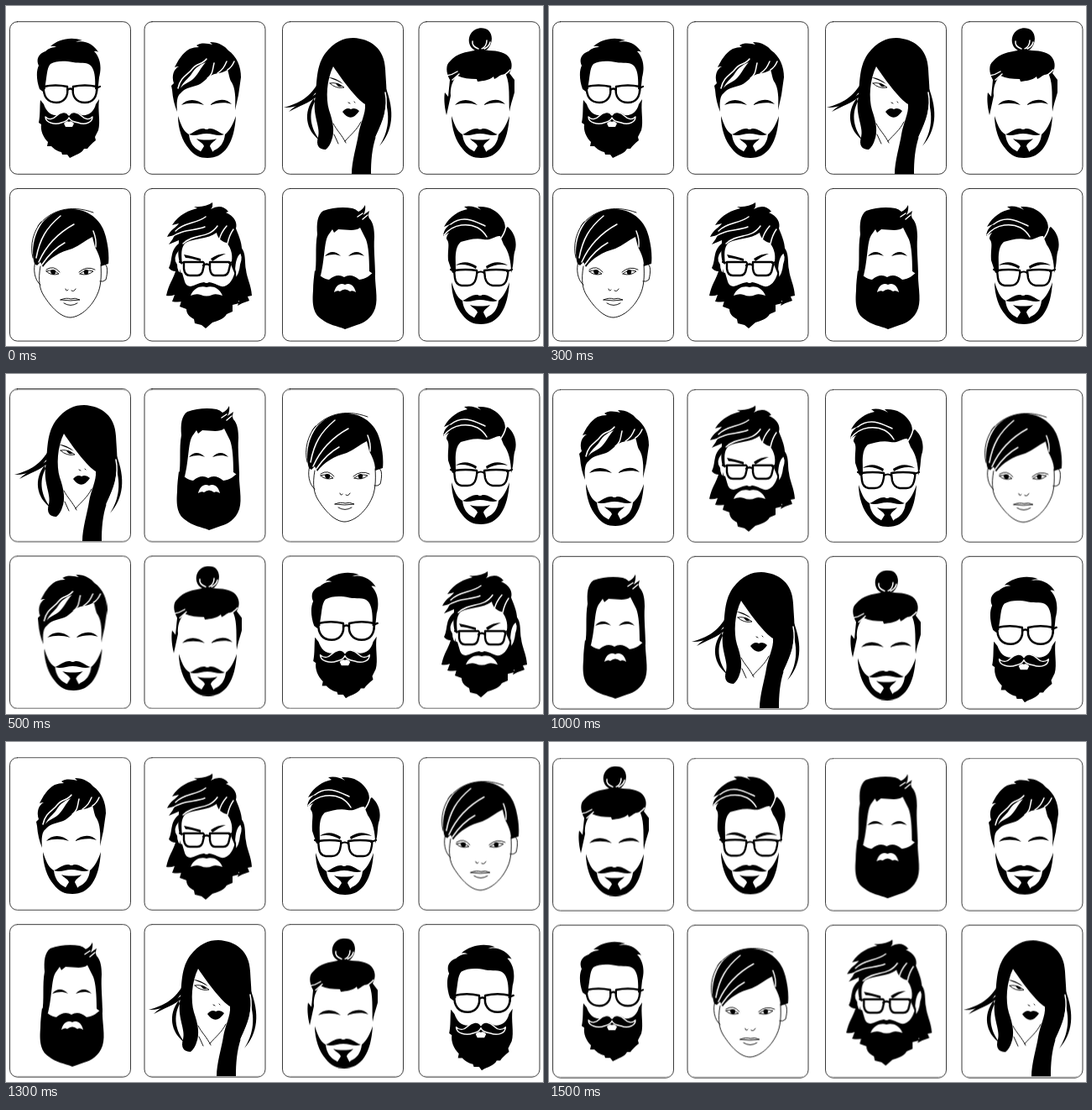
These frames come from a looping animation (640x405 px, 2 s). An HTML page:

```html
<!DOCTYPE html>
<html lang="en">
<head>
<meta charset="utf-8">
<title>Hair styles</title>
<style>
html, body { margin: 0; width: 100%; height: 100%; overflow: hidden; background: #fff; }
svg { display: block; width: 640px; height: 405px; }
path, rect { stroke-linecap: round; stroke-linejoin: round; }
.fill { fill: #000; }
.white { fill: #fff; }
.cut { fill: none; stroke: #fff; stroke-width: 1.5; }
.line { fill: none; stroke: #000; stroke-width: .9; }
.bar { fill: none; stroke: #000; stroke-width: 2.2; }
.rim { fill: #fff; stroke: #000; stroke-width: 2.4; }
.tache { fill: #000; stroke: #fff; stroke-width: 1.4; }
.card { fill: none; stroke: #222; stroke-width: .9; }
</style>
</head>
<body>
<svg id="stage" viewBox="0 0 640 405"></svg>
<script>
const NS = 'http://www.w3.org/2000/svg';
const LOOP = 2000;
const stage = document.getElementById('stage');

function add(parent, tag, attrs = {}) {
  const el = document.createElementNS(NS, tag);
  for (const key in attrs) el.setAttribute(key, attrs[key]);
  return parent.appendChild(el);
}

// Holds each pose [x, y, scale] for an equal share of the loop.
function hold(el, poses) {
  const frames = [...poses, poses[0]].map(([x, y, s = 1], i) => ({
    offset: i / poses.length,
    transform: `translate(${x}px, ${y}px) scale(${s})`,
    easing: 'step-end'
  }));
  el.animate(frames, { duration: LOOP, iterations: Infinity });
}

// Parts shared by several faces.
const goatee = [
  ['fill', 'M205 131C205 146 210 161 218 170C224 178 231 181 240 181C250 181 258 177 264 168C270 159 273 147 274 131C271 140 267 148 261 153C260 163 255 169 248 172L246 174H233L230 172C224 169 219 163 218 153C211 149 208 140 205 131Z'],
  ['fill', 'M218 153C223 151 230 145 236 146Q239 148 242 146C248 145 254 151 260 153C253 156 247 152 239 152C231 152 226 156 218 153Z'],
  ['fill', 'M227 158C233 160 245 160 251 158C248 162 244 163 243 167L247 175H231L236 167C235 163 230 162 227 158Z']
];
const brows = [
  ['fill', 'M209 118C215 110 228 110 236 118C227 115 217 115 209 118Z'],
  ['fill', 'M243 118C251 110 263 110 269 117C262 114 252 115 243 118Z']
];

const heads = [
  { // handlebar moustache
    poses: [[0, 0], [325.2, 196, 1.05], [487.2, 201, 1.05], [0, 199.3]],
    parts: [
      ['fill', 'M40 99C36 88 36 77 39 71C35 63 40 56 47 54C51 50 56 49 60 49Q57 47 53 48C62 40 77 36 91 41Q86 41 83 43C94 40 105 46 110 55Q107 53 105 54C113 62 114 74 111 85L109 104 106 98C107 84 105 75 101 71C96 66 88 69 80 67C70 65 60 65 53 69C48 74 49 86 46 98L44 102Z'],
      ['rim', 'M45 96Q59 93 73 96C75 108 69 115 60 115C50 115 44 108 45 96Z'],
      ['rim', 'M80 96Q94 93 108 96C109 108 104 115 94 115C84 115 78 108 80 96Z'],
      ['bar', 'M73 100Q77 97 80 100M42 96L46 98M107 98L112 96'],
      ['fill', 'M41 112L45 117C48 126 54 131 62 130C66 126 71 125 75 129C79 125 86 126 90 130C98 131 105 126 107 117L111 111C109 124 113 138 110 148L106 156 107 160C102 164 99 167 97 170L93 170C90 176 83 177 76 181L73 177 67 177 66 174C60 173 56 169 54 167L49 167 50 162C44 156 41 148 42 141L39 139C41 130 40 120 41 112Z'],
      ['tache', 'M75 130C71 124 64 127 60 131C56 135 51 136 47 132C47 139 58 142 66 139C70 138 74 136 75 133C76 136 80 138 86 139C94 142 103 139 103 132C99 136 94 135 90 131C86 127 79 124 75 130Z'],
      ['white', 'M69 140Q72 136 75 138Q78 136 81 140L79 144H71Z']
    ]
  },
  { // side sweep
    poses: [[0, 0], [-159.5, 196], [-161, 0], [327, .7]],
    parts: [
      ['fill', 'M198 100L197 95 200 92C197 83 200 75 206 72Q203 72 201 73C205 65 210 56 219 51Q224 49 230 49L227 47C233 43 241 45 246 46L243 43C254 43 261 48 265 53C275 60 280 72 280 85L277 106 273 124C274 108 273 98 269 91C266 87 266 81 264 76C259 80 250 80 246 82C240 84 235 93 226 95C219 97 213 98 208 104C204 107 203 114 204 126Q199 114 198 100Z'],
      ['cut', 'M205 98C208 84 217 82 222 75C227 68 234 70 239 63M240 86C247 81 246 76 248 68M252 80C258 76 260 73 263 66M264 76Q269 73 272 66'],
      ['white', 'M208 98C211 90 217 87 221 81C226 73 231 70 238 67C231 75 229 81 224 86C219 91 212 92 208 98Z'],
      ...brows, ...goatee
    ]
  },
  { // long fringe
    poses: [[0, 0], [-321, -1], [-161, 198], [163, 198.3]],
    parts: [
      ['fill', 'M390 72C382 88 381 110 385 124C390 138 392 150 388 160Q386 167 381 171C373 171 369 166 372 156C375 145 366 132 368 113C371 97 368 74 380 57C391 42 403 38 414 38C435 39 451 51 452 75C453 94 455 108 452 122C451 135 445 146 441 155C436 170 435 185 435 200H412C412 185 418 166 420 153C422 140 429 128 428 117C418 111 402 90 390 72Z'],
      ['fill', 'M373 90C363 108 350 116 331 121C351 121 364 113 373 97Z'],
      ['fill', 'M369 105C358 112 346 117 337 126C350 119 362 115 370 108Z'],
      ['fill', 'M367 110C354 126 357 148 374 160C363 146 360 129 368 114Z'],
      ['fill', 'M452 96C464 126 461 149 445 167C456 150 459 130 450 107Z'],
      ['cut', 'M452 103C456 122 450 137 441 156'],
      ['fill', 'M384 85Q393 85 402 93Q393 88 384 85Z'],
      ['line', 'M386 92Q394 90 403 97Q393 99 386 92'],
      ['fill', 'M393 92Q398 92 400 96Q395 97 393 92Z'],
      ['line', 'M408 115l2 1M415 114l1 1'],
      ['fill', 'M401 126Q406 120 411 123Q416 120 421 125Q411 140 401 126Z'],
      ['line', 'M390 140C394 148 400 153 405 163M423 138C418 148 411 153 404 161M391 153L396 164']
    ]
  },
  { // top bun
    poses: [[0, 0], [-325, 202.5], [-163, 207.5], [-487, 2.5]],
    parts: [
      ['fill', 'M559 53C551 49 550 39 554 33C558 26 569 24 575 29C581 35 580 46 573 52Z'],
      ['cut', 'M563 51Q555 48 556 42M567 51Q573 48 573 41M570 51Q576 48 577 43'],
      ['fill', 'M529 88C524 79 524 70 529 66C537 56 549 55 558 53Q566 50 575 53C586 53 597 56 600 62C604 68 603 75 600 80L606 88 606 103C604 111 601 118 600 126C599 110 601 94 596 82C590 80 587 85 582 87L581 84C575 89 569 89 562 90L561 87C552 87 545 86 538 83C532 88 529 98 530 107L525 130C522 118 522 108 523 103L527 108Z'],
      ['cut', 'M525 83Q532 82 538 78M532 88L540 81M588 85Q596 82 601 76'],
      ...brows, ...goatee
    ],
    shared: [326, 0]
  },
  { // short fringe
    poses: [[0, 0], [327, -195], [488.8, -194.5], [162.8, 4.3]],
    parts: [
      ['fill', 'M34 307C29 291 34 268 46 255C56 246 68 241 80 242C101 243 115 257 119 275C122 287 123 298 122 307L113 310C113 299 108 291 106 287L103 275C95 279 88 285 79 289C64 293 52 300 44 311L41 305 37 309Z'],
      ['cut', 'M36 300C40 278 48 264 65 250M39 305C47 287 59 272 81 260M43 308C49 299 59 288 70 282M107 287Q108 278 104 268'],
      ['line', 'M38 262C53 243 77 236 104 246M32 300C28 284 33 268 42 257M35 305C32 313 34 327 41 332M41 310C38 327 40 337 45 345C54 359 65 371 77 371C90 370 103 357 109 343C113 335 114 322 113 308M114 308C121 304 122 315 119 326Q116 329 112 328'],
      ['line', 'M48 314Q57 308 64 317M87 317Q96 309 106 314M48 316Q56 313 63 319Q54 322 48 316M88 319Q95 313 104 316Q97 322 88 319'],
      ['fill', 'M53 315Q56 313 59 315Q60 320 56 320Q53 319 53 315Z'],
      ['fill', 'M93 315Q96 313 98 315Q99 320 95 320Q92 319 93 315Z'],
      ['line', 'M71 337Q72 341 74 338M78 339Q81 341 83 337M65 350Q72 347 77 349Q82 347 88 350Q77 352 65 350M69 354Q77 359 85 354']
    ]
  },
  { // long hair and beard
    poses: [[0, 0], [328, 1.2], [0, -196.3], [163.3, 1.5]],
    parts: [
      ['fill', 'M207 306C204 295 206 287 206 279L194 284Q199 278 201 273L192 275C196 266 203 264 206 259L198 261C206 248 219 243 228 241L224 239Q238 240 246 234Q247 239 244 242Q257 235 265 245L262 246C272 250 276 258 274 265C278 275 282 284 281 294C274 297 273 309 273 320L268 308C271 299 269 289 263 282C257 281 252 276 251 270C240 278 226 276 214 282C208 288 209 296 210 308Z'],
      ['cut', 'M196 276C211 265 226 268 237 263M202 268C213 257 226 260 238 251M211 283C225 270 241 278 252 262M254 279Q256 270 263 262M264 283Q266 273 271 266'],
      ['fill', 'M206 283C195 291 199 303 194 312Q197 316 202 316C199 326 194 331 191 345Q196 346 201 344L198 352Q209 354 219 349L210 318Q204 318 204 308Q198 301 206 291Z'],
      ['fill', 'M277 285C287 291 284 304 286 314C287 324 292 332 293 345L288 346 290 351Q283 353 276 357L278 351 271 351 273 324Q278 319 279 308Q283 297 277 292Z'],
      ['fill', 'M212 296Q222 298 232 301L232 304Q220 300 214 300Z'],
      ['fill', 'M244 301Q252 295 262 295Q254 298 246 304Z'],
      ['rim', 'M212 305H235Q237 306 235 313Q234 321 228 321H219Q213 321 212 313Z'],
      ['rim', 'M243 305H266Q268 306 266 313Q265 321 259 321H249Q244 321 243 313Z'],
      ['bar', 'M235 309Q239 306 243 309M207 305L212 306M266 306L271 305'],
      ['fill', 'M207 313C211 325 213 334 220 334C225 333 229 330 236 329Q239 331 242 329C250 330 255 335 260 334C267 332 271 325 274 313L275 345 278 354 270 356 270 364 263 367C260 373 252 375 246 377L238 384 233 380 225 378 224 373C218 370 215 366 215 361L207 358 209 351 201 348Q210 334 207 313Z'],
      ['white', 'M220 345C224 335 233 333 239 335C245 333 254 335 258 345Q250 342 246 344Q239 347 232 344Q227 342 220 345Z']
    ]
  },
  { // big beard
    poses: [[0, 0], [-162, -199], [-325, 1.7], [-.5, -198.8]],
    parts: [
      ['fill', 'M368 321C371 305 368 287 371 272C370 259 371 249 378 244C389 240 402 239 413 241Q417 242 420 245Q425 243 428 237Q429 243 426 249L433 244Q431 250 433 253C438 258 439 267 439 275C438 290 440 305 440 321L433 316C433 300 432 286 429 278L422 264C416 269 405 266 396 266L391 270 389 266 384 273C379 281 380 302 375 321Z'],
      ['cut', 'M419 251L425 247M425 254L431 249'],
      ['fill', 'M380 298C386 291 393 292 399 298C392 295 387 296 380 298Z'],
      ['fill', 'M408 298C414 292 421 291 427 298C420 295 415 296 408 298Z'],
      ['fill', 'M368 315C374 321 378 325 385 326C392 320 398 320 403 323C408 320 414 320 421 326C429 325 434 321 440 315C439 331 444 348 440 360C436 372 426 378 418 380L404 385C395 381 384 380 376 373C365 366 365 352 366 339C366 330 367 323 368 315Z'],
      ['white', 'M391 341C393 332 399 329 404 332C409 329 415 332 417 341Q413 338 410 340Q404 335 398 340Q395 338 391 341Z']
    ]
  },
  { // swept back with glasses
    poses: [[0, 0], [0, -200], [-162, -197], [-326, -197.6]],
    parts: [
      ['fill', 'M532 318L527 303C526 290 529 284 526 279Q523 276 528 270L521 274C522 265 527 262 531 259L522 263C529 250 540 244 550 242L546 239Q557 237 566 243L562 239C576 238 585 244 590 251Q595 257 595 265L598 263C606 270 609 280 607 290C604 298 606 306 602 318C602 304 599 292 593 284L589 274C583 273 578 280 569 278C559 276 550 279 542 281C534 288 536 302 536 316Z'],
      ['cut', 'M522 273C534 258 552 259 562 264Q569 268 573 275M530 260C545 248 560 257 571 262M588 279Q594 272 596 263'],
      ['fill', 'M536 309Q547 301 561 310L560 313Q548 306 536 309Z'],
      ['fill', 'M572 310Q585 301 598 309Q585 306 573 313Z'],
      ['rim', 'M534 315Q548 313 561 315Q562 317 560 325Q558 333 550 333H543Q536 332 535 324Z'],
      ['rim', 'M570 315Q584 313 598 315Q599 317 597 325Q595 333 588 333H580Q573 332 571 324Z'],
      ['bar', 'M561 318Q566 315 570 318M530 314L535 316M597 316L603 314'],
      ...goatee
    ],
    shared: [326, 198]
  }
];

const cards = add(stage, 'g');
for (const y of [18.7, 217.5])
  for (const x of [4.5, 165, 329.5, 492])
    add(cards, 'rect', { class: 'card', x, y, width: 144, height: 181.6, rx: 9 });
hold(cards, [[0, 0], [0, -.6], [0, -.2], [0, .6]]);

const common = new Set([...goatee, ...brows]);
for (const { poses, parts, shared = [0, 0] } of heads) {
  const head = add(stage, 'g');
  for (const part of parts) {
    const path = add(head, 'path', { class: part[0], d: part[1] });
    if (common.has(part)) path.setAttribute('transform', `translate(${shared})`);
  }
  hold(head, poses);
}
</script>
</body>
</html>
```
